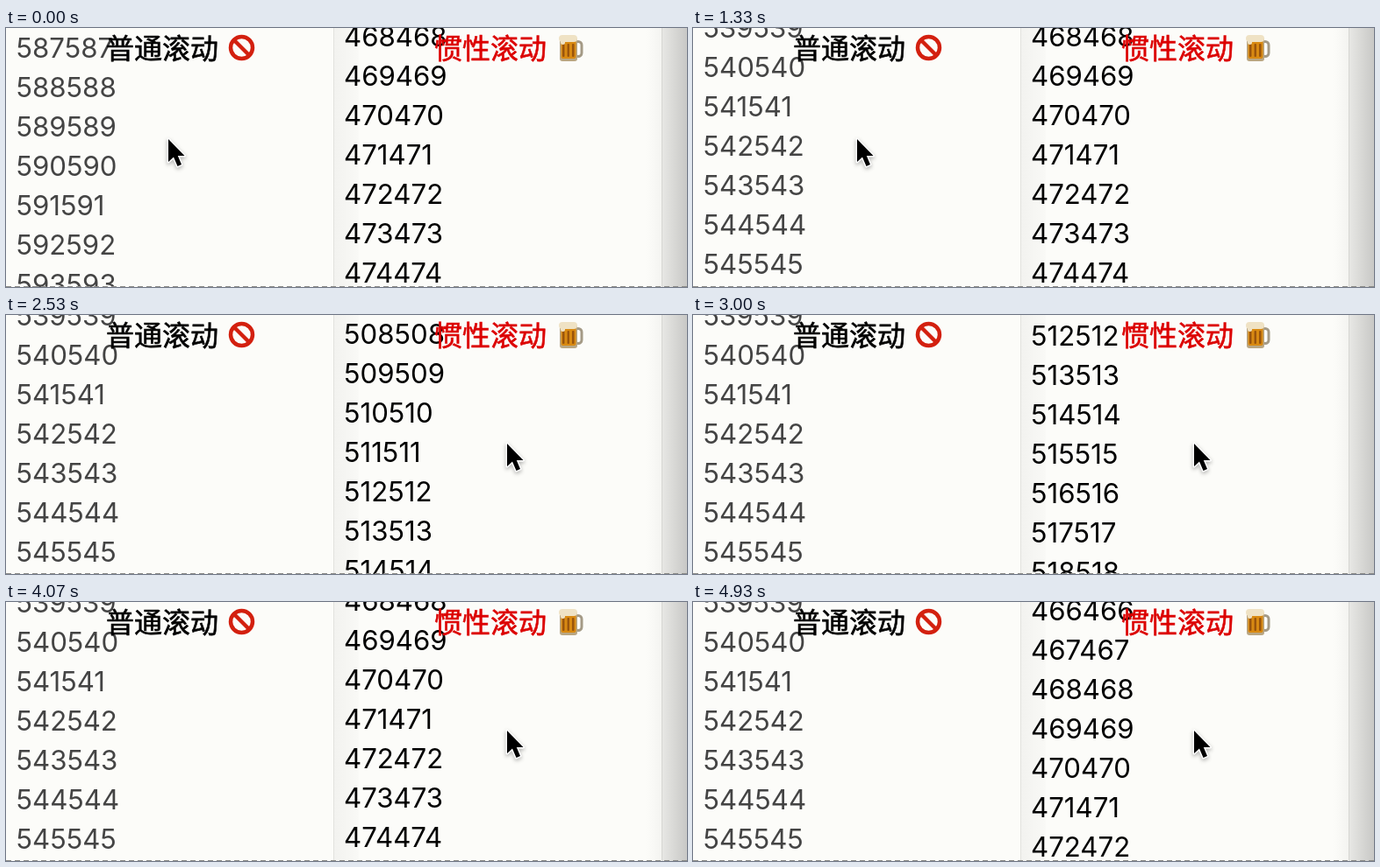
An HTML page with a canvas that plays this animation: 776x296 px, repeating every 4990 ms.

```html
<!DOCTYPE html>
<html lang="zh">
<head>
<meta charset="utf-8">
<style>
html, body { margin: 0; width: 100%; height: 100%; overflow: hidden; background: #fcfcf9; }
canvas { display: block; }
</style>
</head>
<body>
<canvas id="stage" width="776" height="296"></canvas>
<script>
const ctx = document.getElementById('stage').getContext('2d');
const W = 776, H = 296, ROW = 45, LOOP = 4990, FPS = 15;

// Share of a scroll flick done: quick start, then inertia dying away.
function flick(t, start) {
  const x = Math.max(0, t - start) / 134;
  return 1 - (1 + x) * Math.exp(-x);
}

function ease(t, from, to) {
  const u = Math.min(1, Math.max(0, (t - from) / (to - from)));
  return u * u * (3 - 2 * u);
}

// List positions, in rows at the top edge.
const leftTop = t => 586.51 - 47.53 * flick(t, 0);
const rightTop = t => 467.78 + 43.92 * flick(t, 2000) - 45.93 * flick(t, 3432);

function band(x, w, from, to) {
  const g = ctx.createLinearGradient(x, 0, x + w, 0);
  g.addColorStop(0, from);
  g.addColorStop(1, to);
  ctx.fillStyle = g;
  ctx.fillRect(x, 0, w, H);
}

function box(x, y, w, h, r, color) {
  ctx.fillStyle = color;
  ctx.beginPath();
  ctx.roundRect(x, y, w, h, r);
  ctx.fill();
}

function background() {
  ctx.fillStyle = '#fcfcf9';
  ctx.fillRect(0, 0, W, H);
  band(373, 29, '#f2f2ef', '#f9f9f6');
  band(373, 1, '#e2e2de', '#e2e2de');
  band(730, 17, '#fcfcf9', '#f4f4f1');
  band(747, 29, '#e8e8e5', '#c8c8c6');
  band(747, 1, '#d6d6d2', '#d6d6d2');
}

function list(x, top, color) {
  ctx.font = '31.2px Inter, "Liberation Sans", sans-serif';
  ctx.fillStyle = color;
  for (let n = Math.floor(top); n < top + 8; n++) {
    ctx.fillText(`${n}${n}`, x, (n - top) * ROW + 11.5);
  }
}

function title(text, x, color) {
  ctx.font = '32px "Noto Sans CJK SC", "Noto Sans CJK", sans-serif';
  ctx.fillStyle = ctx.strokeStyle = color;
  ctx.lineWidth = 0.6;
  ctx.fillText(text, x, 35);
  ctx.strokeText(text, x, 35);
}

function banSign() {
  ctx.strokeStyle = '#d3200f';
  ctx.lineWidth = 4.5;
  ctx.beginPath();
  ctx.arc(268.5, 22.5, 12.5, 0, 7);
  ctx.moveTo(260, 14);
  ctx.lineTo(277, 31);
  ctx.stroke();
}

function beerMug() {
  ctx.strokeStyle = '#a49a86';
  ctx.lineWidth = 3;
  ctx.beginPath();
  ctx.roundRect(648, 15.5, 8, 17, 4);
  ctx.stroke();
  box(631, 11, 20, 27, 3, '#b9a683');
  box(632.5, 14, 17, 21, 2, '#d98a12');
  for (let x = 634; x < 648; x += 5.5) box(x, 18, 2.5, 15, 1, '#9a550c');
  box(630, 8, 21, 8, 4, '#efe2c4');
  box(632, 11, 5, 8, 2.5, '#efe2c4');
}

function cursor(x, y) {
  const arrow = new Path2D('M1 1V27L7 21.5 11.5 32 16 30 11.8 20H19.5Z');
  ctx.save();
  ctx.translate(x, y);
  ctx.lineJoin = 'round';
  ctx.shadowColor = 'rgba(60,60,60,.4)';
  ctx.shadowBlur = 4;
  ctx.shadowOffsetY = 2;
  ctx.strokeStyle = '#fff';
  ctx.lineWidth = 3;
  ctx.stroke(arrow);
  ctx.shadowColor = 'transparent';
  ctx.fillStyle = '#000';
  ctx.fill(arrow);
  ctx.restore();
}

function bottomLine() {
  ctx.strokeStyle = '#8c8c88';
  ctx.lineWidth = 1;
  ctx.setLineDash([6, 4]);
  ctx.beginPath();
  ctx.moveTo(0, H - 0.5);
  ctx.lineTo(W, H - 0.5);
  ctx.stroke();
  ctx.setLineDash([]);
}

// The picture steps 15 times a second, on whole hundredths.
function stepTime(ms) {
  const step = Math.floor((ms + 4) * FPS / 1000);
  return Math.round(step * 100 / FPS) * 10;
}

const start = performance.now();
function draw() {
  const t = stepTime((performance.now() - start) % LOOP);
  const move = ease(t, 1480, 1960);
  background();
  list(11.5, leftTop(t), '#444');
  list(385, rightTop(t), '#000');
  title('普通滚动', 114, '#000');
  title('惯性滚动', 488, '#dc0000');
  banSign();
  beerMug();
  bottomLine();
  cursor(184 + 2 * flick(t, 0) + 384 * move, 126 + 20 * move);
  requestAnimationFrame(draw);
}
draw();
</script>
</body>
</html>
```
